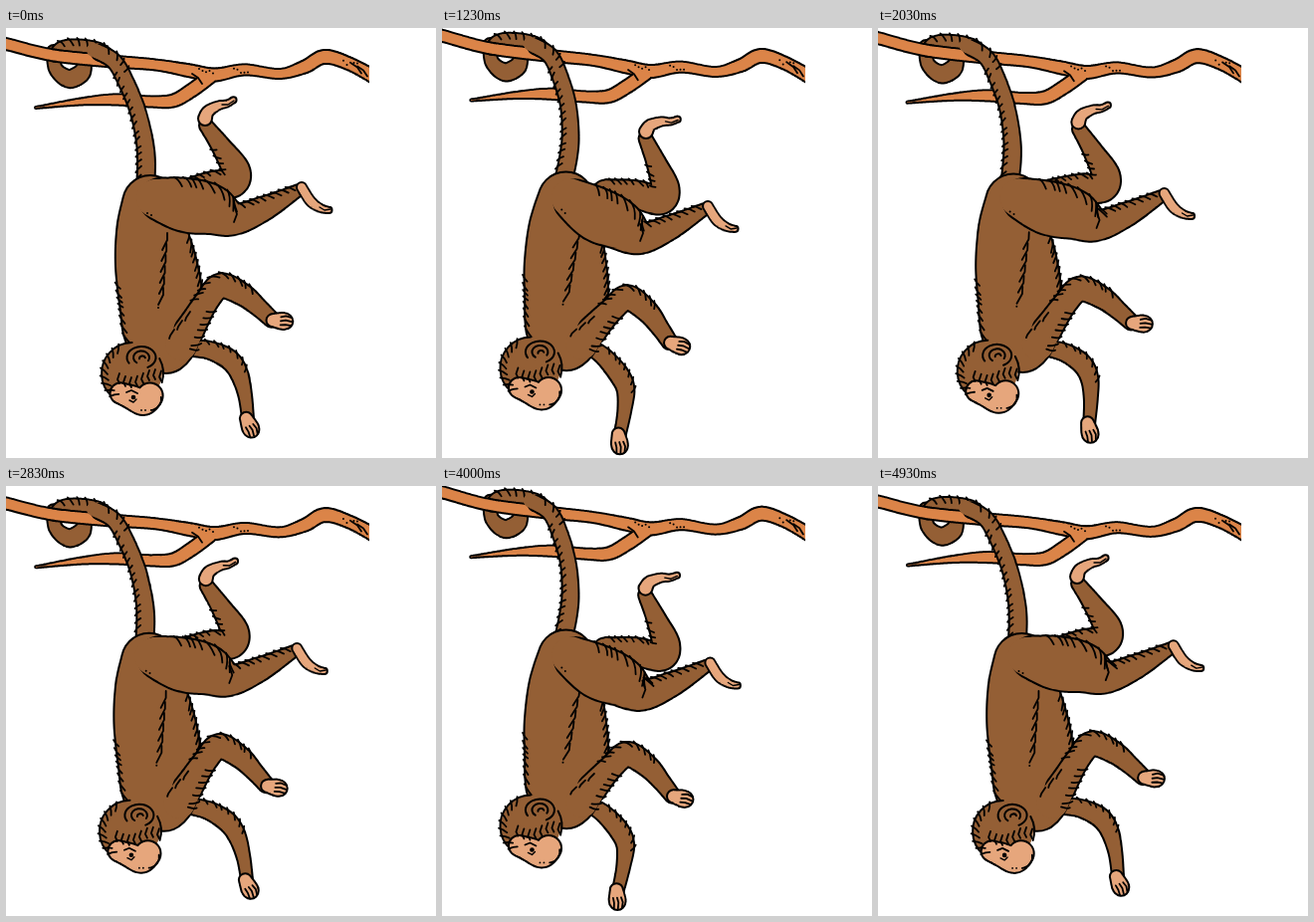
An HTML page with a canvas that plays this animation: 432 px wide and 432 px high, repeating every 5010 ms.

```html
<!DOCTYPE html>
<html lang="en">
<head>
<meta charset="utf-8">
<title>Swinging monkey</title>
<style>
html, body { margin: 0; width: 100%; height: 100%; overflow: hidden; background: #fff; }
canvas { display: block; }
</style>
</head>
<body>
<canvas id="stage" width="432" height="432"></canvas>
<script>
const ctx = document.getElementById('stage').getContext('2d');
const BROWN = '#945f35', BARK = '#db8448', SKIN = '#e6a67c', INK = '#000';
const LOOP = 5010, TAU = 2 * Math.PI;

const clamp = v => Math.max(0, Math.min(1, v));
const lerp = (a, b, w) => a + (b - a) * w;
const noise = n => Math.abs(Math.sin(n * 127.1) * 43758.5) % 1;

const shift = (dx, dy) => (x, y) => [x + dx, y + dy];
const turn = (cx, cy, a, dx = 0, dy = 0) => (x, y) => {
  const c = Math.cos(a), s = Math.sin(a);
  return [cx + dx + (x - cx) * c - (y - cy) * s, cy + dy + (x - cx) * s + (y - cy) * c];
};
// Bends a part between two poses; weight gives the share of the second.
const blend = (f, g, weight) => (x, y) => {
  const a = f(x, y), b = g(x, y), w = clamp(weight(x, y));
  return [lerp(a[0], b[0], w), lerp(a[1], b[1], w)];
};

const spline = (a, b, c, d, u) => b + u / 2 * (c - a + u * (2 * a - 5 * b + 4 * c - d + u * (3 * (b - c) + d - a)));

// Samples a smooth spine through posed joints [x, y, radius], about 1 px apart.
function spine(joints, pose) {
  const q = joints.map(([x, y, r]) => [...pose(x, y), r]);
  const at = i => q[Math.max(0, Math.min(q.length - 1, i))];
  const out = [];
  for (let i = 0; i < q.length - 1; i++) {
    const n = Math.ceil(Math.hypot(q[i + 1][0] - q[i][0], q[i + 1][1] - q[i][1]));
    for (let j = 0; j < n; j++) {
      const [x, y, r] = [0, 1, 2].map(c => spline(at(i - 1)[c], at(i)[c], at(i + 1)[c], at(i + 2)[c], j / n));
      out.push({ x, y, r });
    }
  }
  out.forEach((p, i) => {
    const a = out[Math.max(0, i - 1)], b = out[Math.min(out.length - 1, i + 1)];
    const d = Math.hypot(b.x - a.x, b.y - a.y) || 1;
    p.nx = (a.y - b.y) / d;
    p.ny = (b.x - a.x) / d;
  });
  return out;
}

function sweep(samples, grow, color, from = 0) {
  ctx.fillStyle = color;
  ctx.beginPath();
  for (const p of samples.slice(from)) {
    const r = Math.max(.4, p.r + grow);
    ctx.moveTo(p.x + r, p.y);
    ctx.arc(p.x, p.y, r, 0, TAU);
  }
  ctx.fill();
}
// Outlined union of tapered ribbons; open leaves the root without outline.
function limb(parts, color, open = 0) {
  for (const s of parts) sweep(s, 1, INK, open);
  for (const s of parts) sweep(s, -1, color);
}

function line(points, pose, width = 1.8) {
  ctx.beginPath();
  points.forEach(([x, y]) => ctx.lineTo(...pose(x, y)));
  ctx.lineWidth = width;
  ctx.strokeStyle = INK;
  ctx.stroke();
}
function dot(x, y, pose, r = 1) {
  ctx.fillStyle = INK;
  ctx.beginPath();
  ctx.arc(...pose(x, y), r, 0, TAU);
  ctx.fill();
}
function arc(x, y, rx, ry, from, to, pose, width = 2) {
  ctx.beginPath();
  ctx.ellipse(...pose(x, y), rx, ry, 0, from, to);
  ctx.lineWidth = width;
  ctx.strokeStyle = INK;
  ctx.stroke();
}
// Tufts on one edge (+1 is left of a spine heading down), over a share of its length.
function fur(s, side, from, to, lean = 6, depth = 4, gap = 7) {
  const edge = (p, r) => [p.x + p.nx * r * side, p.y + p.ny * r * side];
  ctx.lineWidth = 1.8;
  ctx.strokeStyle = INK;
  for (let i = Math.floor(s.length * from), n = 0; i < s.length * to; i += gap, n++) {
    const reach = lean * (.75 + .5 * noise(n + 1));
    const tip = s[Math.round(Math.max(0, Math.min(s.length - 1, i + reach)))];
    const mid = s[Math.round(Math.max(0, Math.min(s.length - 1, i + reach / 2)))];
    ctx.beginPath();
    ctx.moveTo(...edge(s[i], s[i].r + 1.5));
    ctx.quadraticCurveTo(...edge(mid, mid.r), ...edge(tip, tip.r - depth));
    ctx.stroke();
  }
}
function hand(x, y, angle, pose) {
  const at = (u, v) => turn(0, 0, angle, x, y)(u, v);
  limb([spine([[...at(-4, 0), 6.5], [...at(6, 0), 8.5], [...at(9, 0), 7.5]], pose)], SKIN);
  for (const v of [-4, 0, 4]) line([at(4, v), at(9, v * 1.1 - 1), at(15, v)], pose);
}

function makePose(k) {
  const wave = d => Math.cos(Math.PI * (k - d) / 25);
  const swing = delay => (Math.cos(Math.PI * delay / 25) - wave(delay)) / 2;
  const s = swing(2.5), leg = swing(.5), back = swing(0), lift = swing(-2);
  const branch = turn(365, 45, .0305 * swing(6));
  const body = turn(140, 153, .11 * s, -19 * s, -4.2 * s);
  const [hx, hy] = body(135, 340);
  const nearUpper = (x, y) => shift(0, 9 * lift)(...body(x, y));
  const farUpper = (x, y) => shift(-10 * s, 12 * lift)(...body(x, y));
  const hinge = (x, y, upper, a) => {
    const [ex, ey] = upper(x, y);
    return turn(x, y, a, ex - x, ey - y);
  };
  const nearFore = hinge(218, 260, nearUpper, .28 * swing(-5));
  const farFore = hinge(236, 338, farUpper, .38 * swing(5));
  const shin = shift(-30 * leg, 19 * leg);
  const farShin = turn(230, 150, .21 * back, -8 * back, 18 * back);
  return {
    branch, body, nearFore, farFore, shin, farShin,
    head: shift(hx - 135, hy - 340),
    tail: blend(branch, body, (x, y) => (y - 22) / 131),
    nearArm: blend(blend(body, nearUpper, (x, y) => (310 - y) / 45), nearFore, x => (x - 207) / 22),
    farArm: blend(blend(body, farUpper, x => (x - 190) / 30), farFore, (x, y) => (y - 325) / 30),
    nearLeg: blend(body, shin, x => (x - 140) / 85),
    farLeg: blend(body, farShin, (x, y) => y < 130 ? 1 : (x - 180) / 45)
  };
}

function drawBranchAndTail({ branch, tail }) {
  limb([spine([[48, 24, 7], [50, 41, 7], [63, 51, 9], [75, 46, 9], [79, 38, 7]], branch)], BROWN);
  const loop = spine([[50, 27, 7], [57, 21, 8], [72, 20, 8.5], [92, 23, 8.5], [104, 31, 8]], branch);
  limb([loop], BROWN);
  fur(loop, -1, .15, .9, 4, 6, 8);

  const bough = spine([[-10, 14, 6], [0, 16, 6], [45, 27, 6], [100, 33, 6], [150, 37, 5.5], [185, 43, 6.5],
    [210, 47, 6.5], [240, 42, 5.5], [275, 46, 5], [300, 39, 6.5], [320, 29, 7], [345, 36, 6.5], [375, 52, 7]], branch);
  const twig = spine([[30, 80, 1], [75, 74, 3.5], [110, 72, 5.5], [145, 74, 5.5], [168, 73, 6.5], [186, 63, 7], [205, 49, 7]], branch);
  limb([bough, twig], BARK);
  for (const [x, y] of [[201, 43], [236, 42], [346, 34]]) {
    for (let i = 0; i < 5; i++) dot(x - 7 + 3.5 * i, y + 5 * noise(x + i) - 2, branch);
  }
  for (const x of [187, 347, 353]) {
    const y = x < 200 ? 46 : x / 2 - 138;
    line([[x, y], [x + 6, y + 4], [x + 10, y + 10]], branch);
  }

  const hanging = spine([[88, 22, 8], [108, 33, 8], [120, 53, 8], [132, 82, 8], [139, 112, 8.5], [141, 135, 9], [140, 162, 9]], tail);
  limb([hanging], BROWN, 8);
  fur(hanging, 1, .25, .95, -5, 4, 8);
  fur(hanging, -1, .08, .25, 4, 5, 8);
}

function drawFarLimbs({ farArm, farFore, farLeg, farShin }) {
  const arm = spine([[188, 322, 8], [205, 324, 9], [224, 333, 10], [234, 347, 9], [240, 368, 7], [243, 392, 6]], farArm);
  limb([arm], BROWN);
  fur(arm, -1, .12, .55, 5, 3);
  hand(243, 396, 1.15, farFore);

  const leg = spine([[201, 98, 7], [217, 120, 10], [231, 143, 14], [228, 156, 14], [208, 158, 14], [182, 164, 12]], farLeg);
  limb([leg], BROWN);
  fur(leg, 1, .2, .38, 5, 4);
  fur(leg, 1, .72, .98, -6, 4, 6);
  limb([spine([[200, 91, 7], [203, 84, 6], [213, 78, 4.5], [222, 76, 3.5], [229, 72, 3]], farShin)], SKIN);
  line([[217, 77], [223, 77], [229, 73]], farShin, 1.4);
}

function drawTorso({ body }) {
  const trunk = spine([[145, 176, 28], [146, 205, 35], [151, 240, 41], [156, 275, 42], [157, 305, 38], [161, 322, 25]], body);
  limb([trunk], BROWN);
  fur(trunk, 1, .5, .98, 8, 3, 8);
  fur(trunk, -1, .25, .7, 11, 4, 7);
  for (let i = 0; i < 6; i++) {
    const x = 162 - i * .8, y = 206 + i * 11;
    line([[x, y], [x, y + 7], [x - 5, y + 17]], body);
  }
  dot(153, 281, body);
}

function drawNearLeg({ nearLeg, shin }) {
  const leg = spine([[150, 171, 20], [180, 178, 27], [205, 182, 25], [229, 192, 16], [260, 181, 12], [294, 163, 6]], nearLeg);
  limb([leg], BROWN, 8);
  fur(leg, -1, .1, .56, 10, 8, 8);
  fur(leg, -1, .6, .92, 7, 5, 7);
  line([[229, 178], [232, 187], [229, 195]], nearLeg);
  for (const x of [142, 146]) dot(x, x / 2 + 115, nearLeg);
  limb([spine([[297, 160, 5], [306, 174, 5], [316, 181, 4], [325, 183, 3]], shin)], SKIN);
  line([[315, 180], [320, 183], [326, 182]], shin, 1.4);
}

function drawNearArm({ nearArm, nearFore }) {
  const arm = spine([[176, 318, 17], [188, 297, 14], [202, 274, 12], [216, 259, 12.5], [238, 268, 11], [254, 281, 9], [267, 293, 8]], nearArm);
  limb([arm], BROWN, 18);
  fur(arm, -1, .32, .72, 6, 4, 6);
  fur(arm, 1, .05, .4, -6, 7, 7);
  for (let i = 0; i < 3; i++) {
    const x = 164 + i * 8, y = 312 - i * 9;
    line([[x + 5, y - 9], [x + 1, y - 3], [x, y]], nearArm);
  }
  hand(272, 294, .08, nearFore);
}

function drawHead({ head }) {
  const skull = spine([[127, 346, 30], [126, 348, 30]], head);
  sweep(skull, 0, BROWN);
  arc(127, 347, 31, 31, 2.3, 4.7, head);
  arc(127, 347, 31, 31, -.5, .3, head);
  limb([spine([[115, 367, 10.5], [126, 371, 12], [138, 376, 13], [145, 369, 13]], head)], SKIN);
  // Fringe above the face and hair round the crown.
  for (let i = 0; i < 8; i++) {
    const x = 112 + i * 6, y = 353 + 4 * Math.sin(i * .8);
    line([[x + 2, y - 6], [x, y], [x + 2, y + 4]], head);
  }
  for (let a = 2.35; a < 4.4; a += .24) {
    const at = (r, b) => [127 + r * Math.cos(b), 347 + r * Math.sin(b)];
    line([at(32.5, a), at(28, a - .08), at(25, a - .2)], head);
  }
  arc(136, 331, 14.5, 11, 2.6, 7.4, head);
  arc(136, 331, 8, 6.5, 2.2, 6.8, head);
  arc(137, 332, 3, 2.5, 3, 6, head);

  line([[121, 366], [126, 364], [132, 367]], head);
  dot(128, 371, head, 2.3);
  line([[124, 374], [128, 376], [131, 373]], head, 1.4);
  arc(145, 373, 11, 11, -.2, 1.5, head, 1.8);
  for (const x of [136, 140]) dot(x, 384, head, .9);
}

function draw(time) {
  const t = time % LOOP;
  // Poses alternate between 30 ms and 70 ms holds.
  const k = Math.min(99, 2 * Math.floor(t / 100) + (t % 100 >= 30 ? 1 : 0));
  const pose = makePose(k);
  ctx.fillStyle = '#fff';
  ctx.fillRect(0, 0, 432, 432);
  ctx.save();
  ctx.beginPath();
  ctx.rect(0, 0, 365, 432);
  ctx.clip();
  ctx.lineCap = ctx.lineJoin = 'round';
  for (const part of [drawBranchAndTail, drawFarLimbs, drawTorso, drawNearLeg, drawNearArm, drawHead]) part(pose);
  ctx.restore();
}

let start;
function tick(now) {
  start ??= now;
  draw(now - start);
  requestAnimationFrame(tick);
}
draw(0);
requestAnimationFrame(tick);
</script>
</body>
</html>
```
